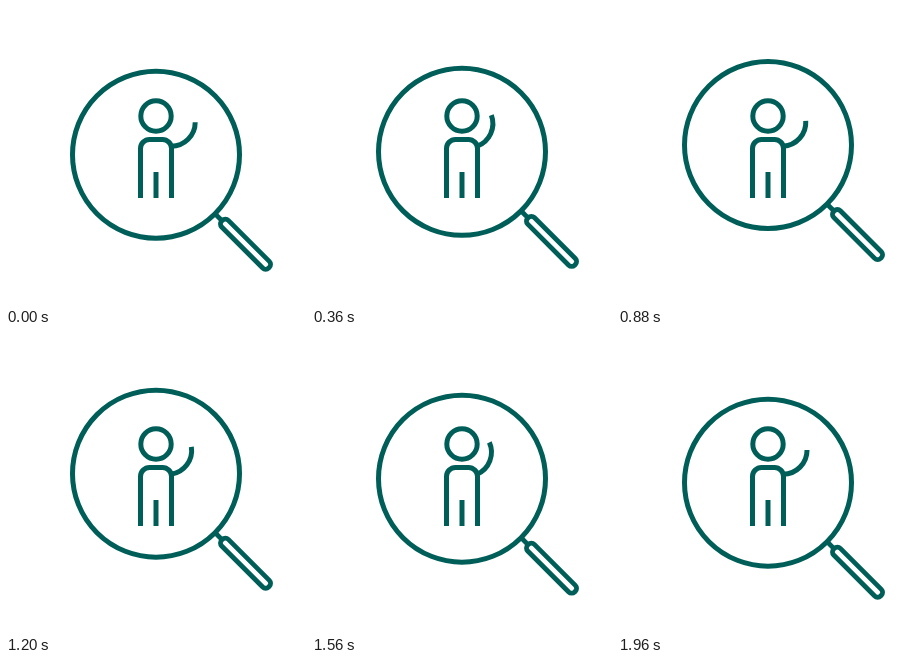
Write an HTML page that moves like this. It is 300 px wide and 300 px high and loops after 2000 ms.

```html
<!DOCTYPE html>
<html lang="en">
<head>
<meta charset="utf-8">
<title>Waving person under a magnifier</title>
<style>
  html, body { margin: 0; width: 100%; height: 100%; overflow: hidden; background: #fff; }
  svg { display: block; width: 100vw; height: 100vh; }
</style>
</head>
<body>
<svg viewBox="0 0 300 300" fill="none" stroke="#005e59" stroke-width="5">
  <g id="glass">
    <circle r="83.5"/>
    <g transform="rotate(45)" stroke-width="4.8">
      <path d="M84 0H93"/>
      <rect x="93.4" y="-4.7" width="66.4" height="9.4" rx="4.2"/>
    </g>
  </g>
  <circle cx="150" cy="110" r="15.2"/>
  <path d="M134.5 192V142.5a9 9 0 0 1 9-9h13a9 9 0 0 1 9 9V192M150 166V192"/>
  <path id="arm" d="M165 140.2A24 24 0 0 0 189.2 116.2"/>
</svg>
<script>
  const LOOP = 2000, STEP = 40;
  const glass = document.getElementById('glass');
  const arm = document.getElementById('arm');
  const wave = (t, period) => Math.cos(2 * Math.PI * t / period);

  function draw(now) {
    const t = Math.floor((now % LOOP) / STEP) * STEP;
    const y = 143.7 + 5 * wave(t, LOOP);
    const angle = -12.5 * (1 - wave(t, LOOP / 2));
    glass.setAttribute('transform', `translate(150 ${y})`);
    arm.setAttribute('transform', `rotate(${angle} 165 140)`);
  }

  const start = performance.now();
  function tick() {
    draw(performance.now() - start);
    requestAnimationFrame(tick);
  }
  tick();
</script>
</body>
</html>
```
